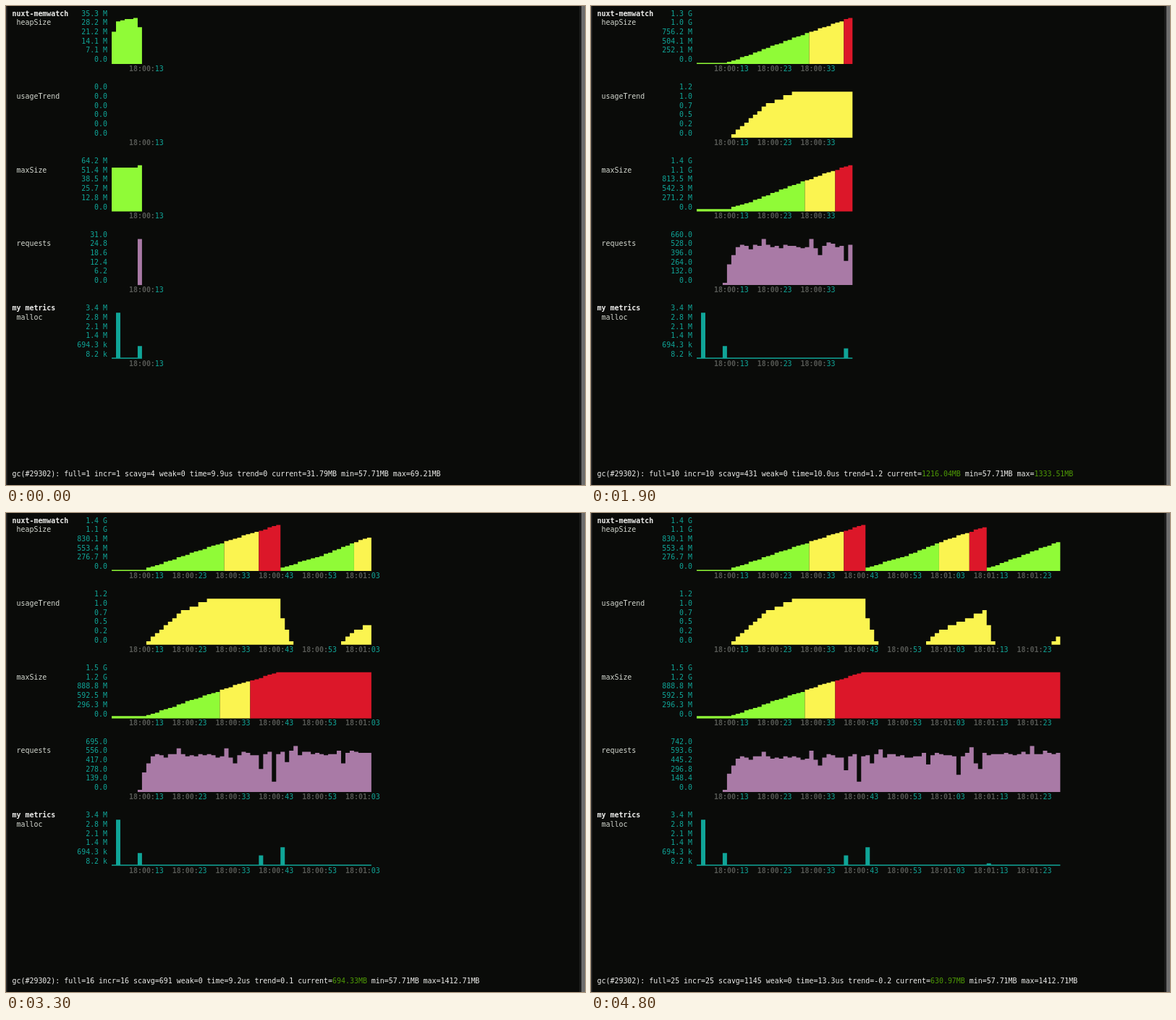
Recreate the animation shown at these times as an HTML page with a canvas. Size 800 by 661 pixels, loop 4900 ms.

```html
<!DOCTYPE html>
<html lang="en">
<head>
<meta charset="utf-8">
<title>Memory monitor</title>
<style>
  html, body { margin: 0; width: 100%; height: 100%; overflow: hidden; background: #0a0b09; }
  canvas { display: block; }
</style>
</head>
<body>
<canvas id="stage" width="800" height="661"></canvas>
<script>
const ctx = document.getElementById('stage').getContext('2d');

const COL = 5.98, ROW = 12.71, LEFT = 8.5, TOP = 3.8;
const STEP = 100, STEPS = 49, CHART_COL = 23, LEVELS = 40;
const GREEN = '#90fb37', YELLOW = '#fbf450', RED = '#dc1729', PURPLE = '#a97aa6', TEAL = '#10a598';
const WHITE = '#eeeeec', SILVER = '#d3d7cf', GRAY = '#555753', CHANGED = '#4e9a06';

// Key points [time, value, ...]; values between them are linear.
const heapKeys = [[0, 25], [1, 33], [5, 35.28], [6, 28.4], [7, 50], [12, 260], [17, 495.1], [29, 1013.85],
  [38, 1383.5], [39, 104], [48, 460], [56, 880], [66, 1325], [67, 90], [83, 870]];
const peakKeys = [[5, 61], [6, 64.2], [7, 81], [12, 284], [17, 541.27], [29, 1104.9], [38, 1481.3]];
const trendKeys = [[7, 0], [16, .9], [17, .9], [23, 1.2], [38, 1.2], [39, .7], [41, .1], [42, 0],
  [52, 0], [55, .3], [66, .9], [67, .5], [68, .1], [69, 0], [81, 0], [83, .2]];

// Step, samples shown, full, scavg, time, trend, current, max
const statusKeys = [
  [0, 7, 1, 4, 9.9, 0, 31.79, 69.21],
  [8, 18, 6, 98, 8.7, .7, 316.57, 366.21],
  [15, 30, 8, 305, 10.5, 1.2, 930.53, 1016.71],
  [20, 38, 10, 462, 9.9, 1.2, 1287.42, 1412.71],
  [23, 43, 14, 535, 10, -.2, 237.66, 1412.71],
  [33, 60, 16, 691, 9.2, .1, 694.33, 1412.71],
  [37, 66, 18, 852, 8.5, .6, 1094.27, 1412.71],
  [42, 74, 24, 1055, 7.8, -.6, 369.53, 1412.71],
  [48, 84, 25, 1145, 13.3, -.2, 630.97, 1412.71]];

// Peaks and dips that stand out of the noise.
const requestSpikes = { 6: 31, 7: 300, 8: 435, 15: 658, 26: 660, 28: 435, 34: 350, 37: 164, 40: 460,
  42: 695, 53: 437, 60: 274, 63: 724, 64: 456, 65: 376, 77: 742 };
const mallocSpikes = { 1: 3438.7, 6: 960, 34: 790, 39: 1390, 67: 170 };

function between(keys, t, column = 1) {
  const next = keys.findIndex(key => key[0] >= t);
  if (next < 0) return keys.at(-1)[column];
  if (next === 0) return keys[0][column];
  const a = keys[next - 1], b = keys[next];
  return a[column] + (b[column] - a[column]) * (t - a[0]) / (b[0] - a[0]);
}

function noise(i) {
  const s = Math.sin(i * 12.9898) * 43758.5453;
  return (s - Math.floor(s)) * 2 - 1;
}

const requests = i => i < 6 ? 0 : requestSpikes[i] ?? 535 + 1.5 * (i - 9) + 40 * noise(i);
const heat = mb => mb >= 1190 ? RED : mb >= 875 ? YELLOW : GREEN;

const charts = [
  { name: 'heapSize', unit: 1e6, min: 0, value: i => between(heapKeys, i), color: heat },
  { name: 'usageTrend', unit: 1, min: 0, value: i => Math.round(between(trendKeys, i) * 10) / 10, color: () => YELLOW },
  { name: 'maxSize', unit: 1e6, min: 0, value: i => between(peakKeys, i), color: heat },
  { name: 'requests', unit: 1, min: 0, value: requests, color: () => PURPLE },
  { name: 'malloc', unit: 1e3, min: 8.2, value: i => mallocSpikes[i] ?? 8.2, color: () => TEAL }];

const colX = col => LEFT + col * COL;
const rowY = row => TOP + row * ROW;

// Writes on the character grid and returns the next free column.
function write(text, col, row, color, weight = 'normal') {
  ctx.font = `${weight} 9.93px "DejaVu Sans Mono", monospace`;
  ctx.fillStyle = color;
  [...text].forEach((ch, i) => ctx.fillText(ch, colX(col + i), rowY(row) + 9.8));
  return col + text.length;
}

function format(v) {
  for (const [size, suffix] of [[1e9, ' G'], [1e6, ' M'], [1e3, ' k']])
    if (v >= size) return (v / size).toFixed(1) + suffix;
  return v.toFixed(1);
}

function drawBars(chart, values, max, bottom) {
  const paths = new Map();
  values.forEach((v, i) => {
    if (!v) return;
    const height = Math.max(1, Math.round(v / max * LEVELS)) * ROW / 8;
    const color = chart.color(v);
    if (!paths.has(color)) paths.set(color, new Path2D());
    paths.get(color).rect(colX(CHART_COL + i), bottom - height, COL, height);
  });
  for (const [color, path] of paths) {
    ctx.fillStyle = color;
    ctx.fill(path);
  }
}

function drawChart(chart, row, count) {
  const values = Array.from({ length: count }, (_, i) => chart.value(i));
  const max = Math.max(...values);

  write(chart.name, 1, row + 1, SILVER);
  for (let k = 0; k <= 5; k++) {
    const label = format((chart.min + (max - chart.min) * k / 5) * chart.unit);
    write(label, 22 - label.length, row + 5 - k, TEAL);
  }
  drawBars(chart, values, max, rowY(row + 6));

  for (let at = 4; at === 4 || count >= at + 5; at += 10) {
    const seconds = at + 9;
    const minute = String(Math.floor(seconds / 60)).padStart(2, '0');
    const col = write(`18:${minute}:`, CHART_COL + at, row + 6, GRAY, 'bold');
    write(String(seconds % 60).padStart(2, '0'), col, row + 6, TEAL);
  }
}

function drawStatus(step) {
  const get = (column, at = step) => between(statusKeys, at, column);
  const full = Math.round(get(2)), scavg = Math.round(get(3));
  const slope = Number(get(5).toFixed(1));
  const growing = get(7) > get(7, step - 1);
  const parts = [
    [`gc(#29302): full=${full} incr=${full} scavg=${scavg} weak=0 time=${get(4).toFixed(1)}us trend=${slope} current=`, WHITE],
    [`${get(6).toFixed(2)}MB`, step ? CHANGED : WHITE],
    [' min=57.71MB max=', WHITE],
    [`${get(7).toFixed(2)}MB`, growing ? CHANGED : WHITE]];
  parts.reduce((col, [text, color]) => write(text, col, 50, color), 0);
}

function box(x, width, color) {
  ctx.fillStyle = color;
  ctx.fillRect(x, 0, width, 661);
}

function draw(now) {
  const step = Math.floor(now / STEP) % STEPS;
  const count = Math.round(between(statusKeys, step));
  box(0, 800, '#0a0b09');
  box(0, 1.5, '#333333');
  box(792.5, 2, '#242424');
  box(795, 5, '#6e6e6e');
  write('nuxt-memwatch', 0, 0, WHITE, 'bold');
  write('my metrics', 0, 32, WHITE, 'bold');
  charts.forEach((chart, i) => drawChart(chart, i * 8, count));
  drawStatus(step);
}

const start = performance.now();
(function tick() {
  draw(performance.now() - start);
  requestAnimationFrame(tick);
})();
</script>
</body>
</html>
```
